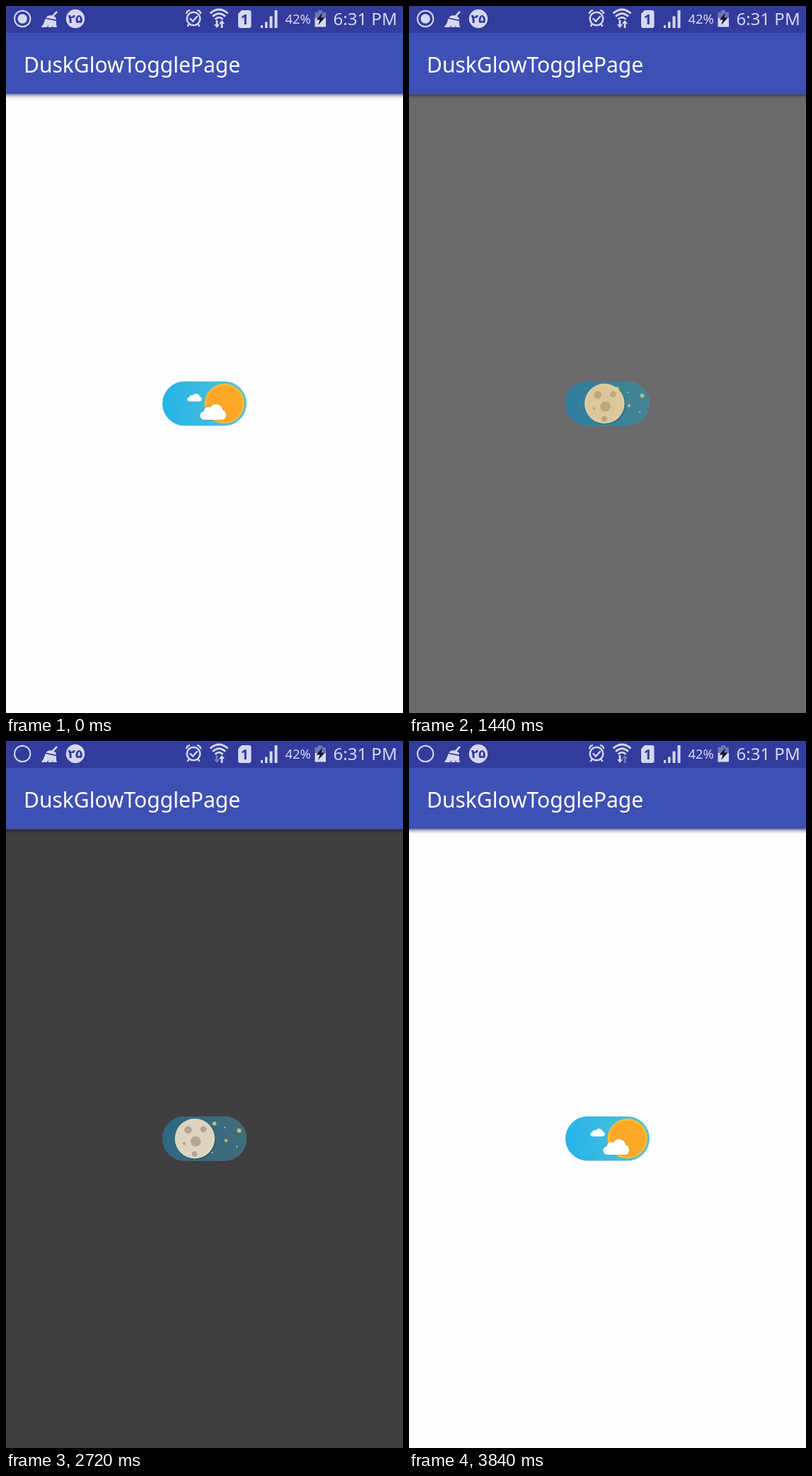
Animation, 561 px wide and 998 px high, one loop 3.88 s. Source, as an HTML page:

```html
<!DOCTYPE html>
<html lang="en">
<head>
<meta charset="utf-8">
<title>Day and night toggle</title>
<style>
  html, body { margin: 0; width: 100%; height: 100%; overflow: hidden; background: #fefefe; }
  svg { display: block; width: 100vw; height: 100vh; }
  text { font-family: "Noto Sans", "Open Sans", sans-serif; }
  .icon { fill: #d6d8ef; }
  .line { fill: none; stroke: #d6d8ef; }
  .ink { fill: #303c9c; }
  .cloud { fill: #fff; filter: drop-shadow(0 0 .8px rgba(90, 90, 90, .3)); }
</style>
</head>
<body>
<svg viewBox="0 0 561 998" preserveAspectRatio="none">
  <defs>
    <linearGradient id="sky">
      <stop offset="0" stop-color="#25b3e7"/>
      <stop offset=".55" stop-color="#3fbcdf"/>
      <stop offset="1" stop-color="#58c2d0"/>
    </linearGradient>
    <linearGradient id="shade" x2="0" y2="1">
      <stop offset="0" stop-color="#000" stop-opacity=".44"/>
      <stop offset=".5" stop-color="#000" stop-opacity=".15"/>
      <stop offset="1" stop-color="#000" stop-opacity="0"/>
    </linearGradient>
    <g id="puff">
      <rect y="10" width="37" height="12" rx="6"/>
      <circle cx="11.5" cy="10" r="6"/>
      <circle cx="22.5" cy="9.7" r="9.7"/>
      <circle cx="30.5" cy="14" r="6"/>
    </g>
    <clipPath id="pill"><rect x="221" y="530" width="119" height="62.5" rx="31.2"/></clipPath>
  </defs>

  <rect id="page" width="561" height="998"/>
  <rect y="124.5" width="561" height="6.5" fill="url(#shade)"/>
  <rect width="561" height="38" fill="#323c9d"/>
  <rect y="38" width="561" height="86.5" fill="#3f50b4"/>
  <text x="25" y="94" font-size="30" fill="#fff">DuskGlowTogglePage</text>

  <!-- status bar, left -->
  <circle class="line" cx="23.2" cy="18" r="11.2" stroke-width="2"/>
  <circle id="dot" class="icon" cx="23.2" cy="18" r="6.7"/>
  <path class="icon" d="M71 7 L73 8.700 L67.500 14.500 Q71 15.500 71 19.500 L56.500 16.500 Q59 12.500 65 13.500 Z
    M55.500 18 L71 21.200 Q70.500 26 72 30 H66.500 L66 27 L65 30 H59.500 L60.500 26.500 L57.500 30 H49.500 Q54 25 55.500 18 Z"/>
  <circle class="icon" cx="98" cy="18" r="13.2"/>
  <text class="ink" x="98" y="24" font-size="17" font-weight="700" text-anchor="middle"
    style="font-family: 'DejaVu Sans', sans-serif">۲۵</text>

  <!-- status bar, right -->
  <g class="line" stroke-width="2.4" stroke-linecap="round">
    <circle cx="265" cy="18" r="9.3"/>
    <path d="M260.5 18 L264 21.5 L270 15 M255 10 Q256 7 259 6.2 M271 6.2 Q274 7 275 10
      M258.500 26 L257 28 M271.500 26 L273 28"/>
  </g>
  <g class="line" stroke-width="2.8">
    <path d="M288.5 10.5 Q301 -.5 313.5 10.5 M292 14.7 Q301 6.5 310 14.7 M295.5 18.7 Q301 13.5 306.5 18.7"/>
  </g>
  <path id="down" class="icon" d="M296.6 20 H299.4 V26 H302 L298 31 L294 26 H296.6 Z"/>
  <path id="up" class="icon" d="M303.6 31 H306.4 V25 H309 L305 20 L301 25 H303.6 Z"/>
  <path class="icon" d="M333 6 H343.5 Q346.5 6 346.5 9 V28 Q346.5 31 343.5 31 H331 Q328 31 328 28 V11 Z"/>
  <text class="ink" x="337.2" y="26" font-size="20" font-weight="700" text-anchor="middle">1</text>
  <path class="icon" d="M360 27 h3 v4 h-3 Z M366 22.5 h3.5 v8.5 h-3.5 Z
    M372.5 14.5 h4 v16.5 h-4 Z M379.5 6 h4 v25 h-4 Z"/>
  <text class="icon" x="394.5" y="25" font-size="18.3">42%</text>
  <path d="M441 6 h6 v3 h5 v10 h-15.5 v-10 h4.5 Z" fill="#7076b8"/>
  <rect class="icon" x="436.5" y="17" width="15.5" height="12.5"/>
  <path d="M447 9.5 L438.5 19.5 H443.5 L441 27 L450.5 16.5 H445.3 Z" fill="#11132e"/>
  <text class="icon" x="462.5" y="27" font-size="24">6:31 PM</text>

  <!-- toggle -->
  <g clip-path="url(#pill)">
    <rect x="221" y="530" width="119" height="63" fill="url(#sky)"/>
    <g id="night">
      <rect x="221" y="530" width="119" height="63" fill="#354553"/>
      <g fill="#fbc244">
        <circle cx="294.5" cy="540" r="2.8"/>
        <circle cx="329.5" cy="550" r="3"/>
        <circle cx="311" cy="564" r="2.2"/>
      </g>
      <g fill="#a9b7bd">
        <circle cx="309.3" cy="545.5" r="1.3"/>
        <circle cx="326" cy="572.7" r="1.2"/>
        <circle cx="291.3" cy="581.3" r="1.3"/>
        <circle cx="296.3" cy="559" r=".8"/>
      </g>
    </g>
    <g id="thumb">
      <g id="sun">
        <circle r="28.2" fill="#f8bd3c"/>
        <circle r="25.6" fill="#ffa828"/>
      </g>
      <g id="moon">
        <circle cx="1" cy=".8" r="28.6" fill="#222e38" opacity=".6"/>
        <circle r="28.2" fill="#eff3f6"/>
        <g fill="#b0b3b6" stroke="#999da1" stroke-width=".7">
          <circle cx="-9.5" cy="-12.3" r="4.8"/>
          <circle cx="12" cy="-13.3" r="3.8"/>
          <circle cx="1.2" cy="4" r="6.7"/>
          <circle cx="-15" cy="7" r="1.6"/>
          <circle cx="-.3" cy="21.7" r="3.5"/>
        </g>
      </g>
      <g id="clouds">
        <use class="cloud" href="#puff" transform="translate(-34.5 .8)"/>
        <use class="cloud" href="#puff" transform="translate(-52.5 -14) scale(.55 .5)"/>
      </g>
    </g>
  </g>
</svg>
<script>
  const LOOP = 3880;
  const TICKS = [840, 720, 560, 440, 280, 160, 0];   // redraw moments within each second
  const DUSK = { start: 1080, length: 654 };
  const DAWN = { start: 2528, length: 574 };
  const DOT_OFF = [[720, 1000], [2280, 2840], [3440, LOOP]];
  const UP_DIM = [[2000, 2160], [3720, LOOP]];
  const DOWN_DIM = [[2440, 3160]];

  const $ = id => document.getElementById(id);
  const fade = (id, opacity) => { $(id).style.opacity = opacity; };
  const within = (t, spans) => spans.some(([a, b]) => t >= a && t < b);
  const ease = (t, { start, length }) => {
    const p = Math.min(1, Math.max(0, (t - start) / length));
    return .5 - .5 * Math.cos(Math.PI * p);
  };
  const snap = t => {
    const second = Math.floor(t / 1000) * 1000;
    return second + TICKS.find(k => k <= t - second);
  };

  function draw(t) {
    const day = Math.min(1, Math.max(0, 1 - ease(t, DUSK) + ease(t, DAWN)));
    const dark = Math.pow(1 - day, 1.3);
    const grey = Math.round(254 * day);
    const green = Math.round(254 * day - 9 * day * (1 - day));
    const page = `rgb(${grey},${green},${grey})`;
    $("page").setAttribute("fill", page);
    document.body.style.background = page;
    fade("night", dark);
    fade("moon", dark);
    fade("sun", Math.pow(day, .35));
    fade("clouds", Math.max(0, day * 2 - 1));
    $("thumb").setAttribute("transform", `translate(${252.8 + 55.9 * day} 561.3)`);
    fade("dot", within(t, DOT_OFF) ? 0 : 1);
    fade("up", within(t, UP_DIM) ? .4 : 1);
    fade("down", within(t, DOWN_DIM) ? .4 : 1);
  }

  const origin = performance.now();
  function frame() {
    draw(snap((performance.now() - origin) % LOOP));
    requestAnimationFrame(frame);
  }
  frame();
</script>
</body>
</html>
```
